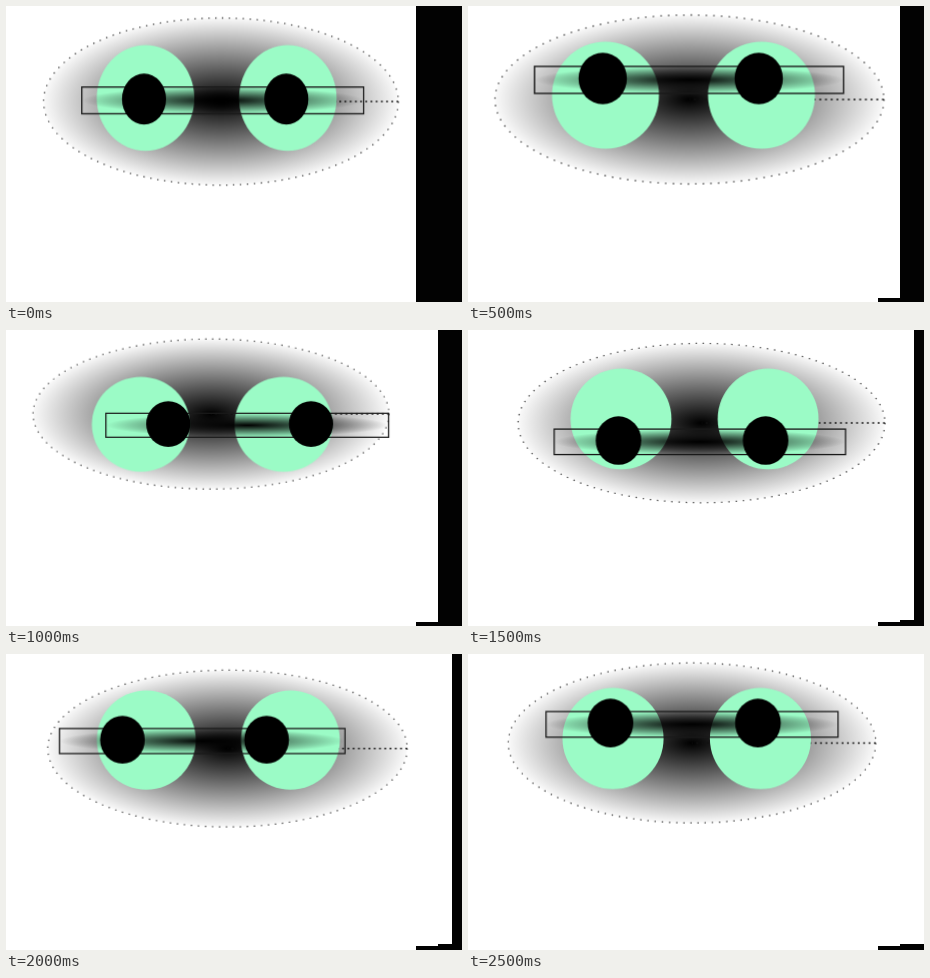
Animation of 456x296 px, one loop 3 s. Source, as an HTML page without scripts:

```html
<!DOCTYPE html>
<html lang="en">
<head>
<meta charset="utf-8">
<title>Restless eyes</title>
<style>
  html, body { margin: 0; width: 100%; height: 100%; overflow: hidden; background: #fff; }
  svg { display: block; width: 456px; height: 296px; }

  .face, .eyes, .gaze, .glint, .bar { animation: 3s step-end infinite; }
  .face { animation-name: face; }
  .eyes { animation-name: eyes; }
  .gaze { animation-name: gaze; }
  .glint { animation-name: glint; }
  .near { animation-name: near; }
  .mid { animation-name: mid; }
  .far { animation-name: far; }
  .bar { fill: #020202; }

  /* Each pose holds for half a second, then jumps. */
  @keyframes face {
    0% { transform: translate(215px, 95.5px) scale(.912, .989); }
    16.667% { transform: translate(221.5px, 93.5px); }
    33.333% { transform: translate(205px, 84px) scale(.915, .888); }
    50% { transform: translate(233.5px, 93px) scale(.943); }
    66.667% { transform: translate(221.5px, 94.5px) scale(.924, .928); }
    83.333%, 100% { transform: translate(224px, 89px) scale(.945, .947); }
  }
  @keyframes eyes {
    0% { transform: translate(139.5px, 92px) scale(.912, .989); }
    16.667% { transform: translate(137.5px, 89.2px); }
    33.333% { transform: translate(134.8px, 94.3px) scale(.915, .888); }
    50% { transform: translate(153px, 89px) scale(.943); }
    66.667% { transform: translate(140.3px, 86px) scale(.924, .928); }
    83.333%, 100% { transform: translate(145px, 84.5px) scale(.945, .947); }
  }
  @keyframes gaze {
    0% { transform: translate(138px, 93px) scale(.912, .989); }
    16.667% { transform: translate(134.7px, 72.5px); }
    33.333% { transform: translate(162.3px, 94px) scale(.915, .888); }
    50% { transform: translate(150.5px, 110.5px) scale(.943); }
    66.667% { transform: translate(116.5px, 85.7px) scale(.924, .928); }
    83.333%, 100% { transform: translate(142.5px, 69px) scale(.945, .947); }
  }
  @keyframes glint {
    0%, 66.667%, 100% { opacity: 0; }
    50% { opacity: 1; }
  }
  @keyframes near {
    0% { transform: none; }
    16.667%, 100% { transform: translateY(292px); }
  }
  @keyframes mid {
    0% { transform: none; }
    50%, 100% { transform: translateY(290px); }
  }
  @keyframes far {
    0% { transform: none; }
    83.333%, 100% { transform: translateY(290px); }
  }
</style>
</head>
<body>
<svg viewBox="0 0 456 296">
  <defs>
    <radialGradient id="shade">
      <stop offset="0" stop-color="#000"/>
      <stop offset="1" stop-color="#fafafa"/>
    </radialGradient>
    <radialGradient id="band">
      <stop offset="0" stop-color="#000"/>
      <stop offset="1" stop-color="#000" stop-opacity="0"/>
    </radialGradient>
    <linearGradient id="streak">
      <stop offset="0" stop-color="#345" stop-opacity="0"/>
      <stop offset="1" stop-color="#345" stop-opacity=".5"/>
    </linearGradient>
    <g id="eye">
      <circle r="53.5" fill="#9bfbc6"/>
      <rect class="glint" x="16" y="-.8" width="37.5" height="1" fill="url(#streak)"/>
    </g>
    <ellipse id="pupil" rx="24.2" ry="25.7"/>
  </defs>

  <g class="face">
    <ellipse rx="194.5" ry="84.5" fill="url(#shade)"/>
    <g fill="none" stroke="#333" stroke-width="1.3">
      <ellipse rx="194.5" ry="84.5" stroke-dasharray="1.4 6.2"/>
      <path d="M194.5 0H0" stroke="#111" stroke-width="1.6" stroke-dasharray="2 3.7"/>
    </g>
  </g>
  <g class="eyes">
    <use href="#eye"/>
    <use href="#eye" x="156"/>
  </g>
  <g class="gaze">
    <rect x="-68.2" y="-12.1" width="309" height="27" fill="url(#band)" stroke="#1a1a1a" stroke-width="1.4"/>
    <use href="#pupil"/>
    <use href="#pupil" x="156"/>
  </g>

  <rect class="bar near" x="410" width="22" height="296"/>
  <rect class="bar mid" x="432" width="14" height="296"/>
  <rect class="bar far" x="446" width="10" height="296"/>
</svg>
</body>
</html>
```
